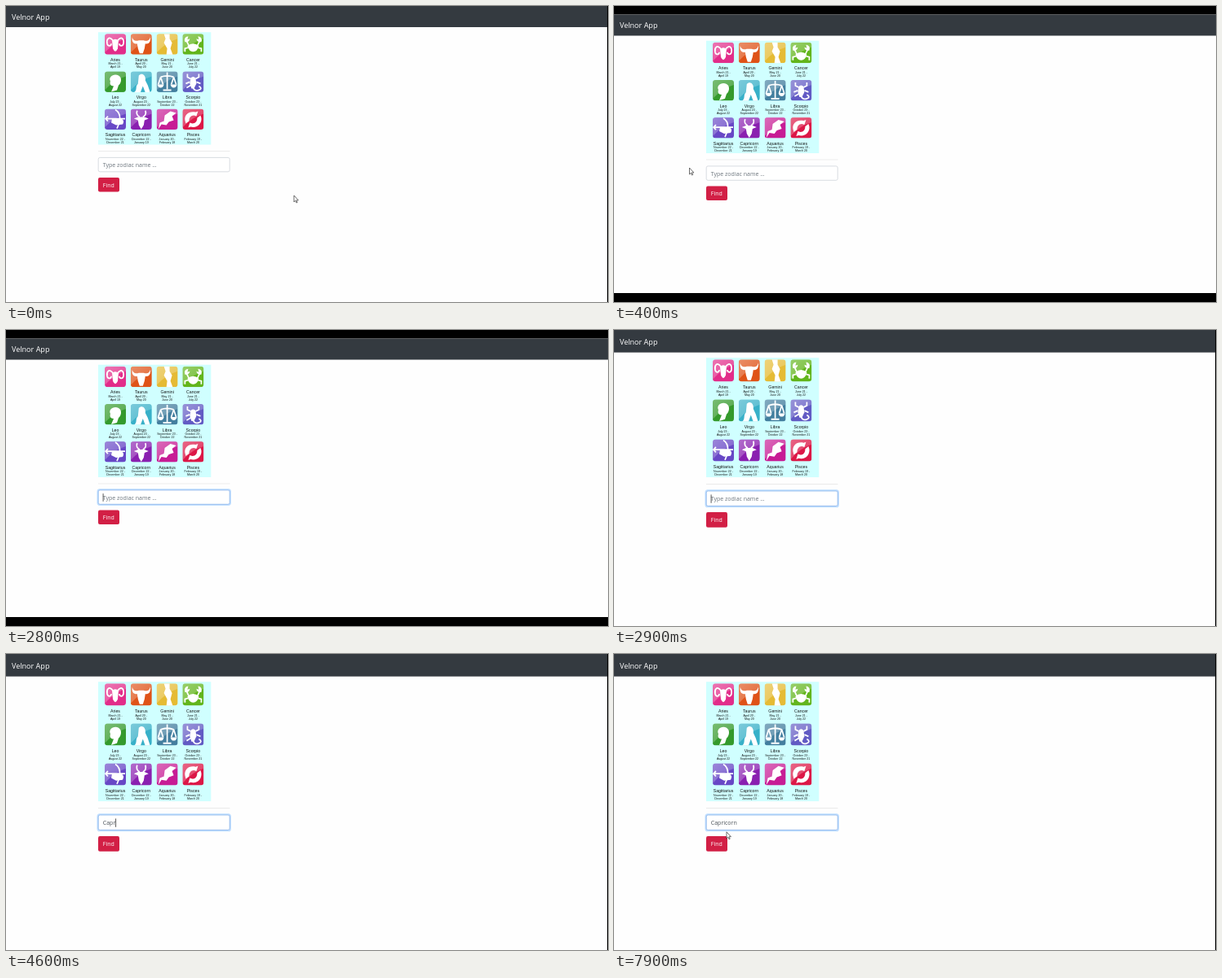
An HTML page that plays this animation: 738 px wide and 364 px high, repeating every 8 s.

```html
<!DOCTYPE html>
<html lang="en">
<head>
<meta charset="utf-8">
<style>
html, body { margin: 0; width: 100%; height: 100%; overflow: hidden; background: #fff; }
svg { display: block; width: 738px; height: 364px; }
.ui { font-family: "Open Sans", sans-serif; font-size: 7px; white-space: pre; }
.chart { font-family: "Liberation Sans", Arial, sans-serif; text-anchor: middle; fill: #111; }
</style>
</head>
<body>
<svg viewBox="0 0 738 364" xmlns="http://www.w3.org/2000/svg">
  <defs>
    <linearGradient id="shine" x1="0" y1="0" x2="1" y2="1">
      <stop offset="0" stop-color="#fff" stop-opacity=".34"/>
      <stop offset="1" stop-color="#fff" stop-opacity=".12"/>
    </linearGradient>
    <clipPath id="tile"><rect width="26" height="25.5" rx="3.6"/></clipPath>
  </defs>
  <rect width="738" height="364" fill="#fefefe"/>
  <g id="page" class="ui">
    <rect width="738" height="26" fill="#343a40"/>
    <text x="7" y="16.6" font-size="9.05" fill="#fff">Velnor App</text>
    <rect x="113" y="32.2" width="138.3" height="138.3" fill="#d0ffff"/>
    <g id="chart" class="chart"></g>
    <path d="M113 178.5H274.5" stroke="#e4e4e4" stroke-width=".7"/>
    <rect id="ring" x="112.3" y="185.5" width="162.9" height="19.2" rx="2.6" fill="none" stroke="#bfdeff" stroke-width="1.6"/>
    <rect id="field" x="113.2" y="186.4" width="161" height="17.4" rx="2" fill="#fff" stroke-width=".8"/>
    <text id="value" x="118.8" y="198.1"></text>
    <path id="caret" stroke="#333" stroke-width=".8"/>
    <rect x="113" y="211" width="26" height="17.6" rx="2" fill="#d21f45"/>
    <text x="118.8" y="222.5" fill="#fff">Find</text>
  </g>
  <g id="bars"><rect width="738" height="10.4"/><rect y="353" width="738" height="11"/></g>
  <rect id="edge" x="737" width="1" height="364"/>
  <path id="arrow" d="M0 0V8L1.8 6.3 3 9 4.2 8.5 3 5.9H5.4Z" fill="#fff" stroke="#333" stroke-width=".7"/>
  <path id="beam" d="M-1.5-4H1.5M0-4V4M-1.5 4H1.5" stroke="#333" stroke-width=".7"/>
</svg>
<script>
const el = id => document.getElementById(id);
const set = (id, attrs) => { for (const k in attrs) el(id).setAttribute(k, attrs[k]); };
const show = (id, on) => set(id, { visibility: on ? "visible" : "hidden" });

// name, first day, last day, colour, filled shape, stroked shape
const signs = [
  ["Aries", "March 21", "April 19", "#e22d8a",
    "M9 8Q13 5 17 8L16 18Q13 25 10 18Z", "M10 8C5 2 2 7 3 12C4 16 8 15 8 12M16 8C21 2 24 7 23 12C22 16 18 15 18 12"],
  ["Taurus", "April 20", "May 20", "#df5318",
    "M2 4C3 9 7 9 10 8H16C19 9 23 9 24 4C25 10 22 13 18 12L17 18 15 24H11L9 18 8 12C4 13 1 10 2 4Z", ""],
  ["Gemini", "May 21", "June 20", "#e5bb35",
    "M9 0H16V6L19 11 17 18 20 26H12L13 18 9 11 11 6Z", ""],
  ["Cancer", "June 21", "July 22", "#62b51c",
    "M6 15Q13 9 20 15Q18 22 13 22Q8 22 6 15ZM3 10Q1 4 7 3L6 7 9 6Q8 11 3 10ZM23 10Q25 4 19 3L20 7 17 6Q18 11 23 10Z",
    "M5 9L8 15M21 9L18 15M7 17L3 18 3 22M19 17L23 18 23 22"],
  ["Leo", "July 23", "August 22", "#349a2c",
    "M7 12C4 7 11 2 17 5C22 8 20 15 17 17L15 23 8 25 11 18C7 18 6 15 7 12Z", ""],
  ["Virgo", "August 23", "September 22", "#38b0c8",
    "M10 5C14 1 19 5 18 11L21 17 24 26H18L15 18 12 26H4C9 22 5 19 9 15Z", ""],
  ["Libra", "September 23", "October 22", "#437f9f",
    "M1 16H9Q8 20 5 20Q2 20 1 16ZM17 16H25Q24 20 21 20Q18 20 17 16ZM8 22H18V24H8Z",
    "M13 1V22M5 7Q13 4 21 7M5 7L2 16M5 7L8 16M21 7L18 16M21 7L24 16"],
  ["Scorpio", "October 23", "November 21", "#625bc4",
    "M10 8Q13 5 16 8L17 15 14 21H11L9 15Z",
    "M10 9L6 7 6 3M16 9L20 7 20 3M9 13L4 15M17 13L22 15M10 17L5 20M13 20Q15 25 20 23T20 18"],
  ["Sagittarius", "November 22", "December 21", "#6848c6",
    "M9 12H20Q25 14 22 19L14 20 8 17Z", "M1 12H25M13 1Q23 7 15 24M4 9L1 12 4 15"],
  ["Capricorn", "December 22", "January 19", "#8a20b0",
    "M9 10H17L22 12 17 14 16 20 13 25 10 20 9 14 4 12Z", "M11 10Q6 7 8 2M15 10Q20 7 18 2"],
  ["Aquarius", "January 20", "February 18", "#c71c95",
    "M10 8L17 3 24 5 19 9 21 14 15 16 12 20 6 19 2 25 4 17 9 15Z", ""],
  ["Pisces", "February 19", "March 20", "#dc1747",
    "M3 14C2 7 8 2 16 4L19 3 17 9 14 8C10 8 8 11 8 15L4 18ZM23 11C24 18 18 24 10 22L7 23 9 17 12 18C16 18 18 15 18 11L22 8Z", ""]
];

el("chart").innerHTML = signs.map(([name, from, to, color, fill, line], i) => {
  const x = 121 + (i % 4) * 31.8, y = 34.2 + Math.floor(i / 4) * 46.2;
  const label = (dy, size, text) =>
    `<text x="${x + 13}" y="${y + dy}" font-size="${size}">${text}</text>`;
  return `<g transform="translate(${x} ${y})" clip-path="url(#tile)">
    <rect width="26" height="25.5" fill="${color}"/>
    <path d="M0 0H26V6Q12 10 0 23Z" fill="url(#shine)"/>
    <path d="${fill}" fill="#fff"/>
    <path d="${line}" fill="none" stroke="#fff" stroke-width="1.7"/></g>` +
    label(33.6, 5.2, name) + label(38.1, 3.6, from + " -") + label(42.2, 3.6, to);
}).join("");

const LOOP = 8000, FOCUS = 1800;
const strokes = [3300, 4200, 4400, 4600, 5200, 5700, 6200, 6900, 7200];
const word = "Capricorn";
const approach = [[0, 353, 233], [100, 290, 224], [400, 92.5, 199], [900, 131, 208],
  [1200, 133, 212], [1600, 120, 206], [2400, 120, 206]];
const leave = [[7700, 158, 207], [7800, 148, 212], [7900, 138, 218.8], [8000, 138, 218.8]];

function pointAt(path, t) {
  const i = Math.max(1, path.findIndex(k => k[0] >= t));
  const [t0, x0, y0] = path[i - 1], [t1, x1, y1] = path[i];
  const p = (t - t0) / (t1 - t0);
  return [x0 + (x1 - x0) * p, y0 + (y1 - y0) * p];
}

function draw(ms) {
  const t = Math.floor((ms % LOOP) / 100) * 100;
  const boxed = t >= 100 && t < 2900, stretched = t >= 2900;
  const scale = stretched ? 1.062 : 1, shift = boxed ? 10.5 : 0;
  set("page", { transform: `translate(0 ${shift}) scale(1 ${scale})` });
  show("bars", boxed);
  show("edge", !boxed);

  const typed = strokes.filter(s => s <= t).length;
  const focused = t >= FOCUS;
  set("ring", { opacity: focused ? Math.min(1, (t - FOCUS + 100) / 200) : 0 });
  set("field", { stroke: focused ? "#80aeea" : "#ced4da" });
  el("value").textContent = typed ? word.slice(0, typed) : "Type zodiac name ...";
  set("value", { fill: typed === 1 ? "#b8525c" : typed ? "#495057" : "#6c757d" });

  const lastKey = typed ? strokes[typed - 1] : FOCUS;
  const caretX = 119.1 + (typed ? el("value").getComputedTextLength() : 0);
  set("caret", { d: `M${caretX} 190.6V200.4` });
  // the single letter is seen with its caret already off after 400 ms
  const blink = typed === 1 ? 400 : 500;
  show("caret", focused && Math.floor((t - lastKey) / blink) % 2 === 0);

  const path = t < 2400 ? approach : t >= 7700 ? leave : null;
  const [x, y] = path ? pointAt(path, t) : [0, 0];
  const pageY = (y - shift) / scale;
  const inField = x > 113 && x < 274 && pageY > 186 && pageY < 204;
  for (const id of ["arrow", "beam"]) set(id, { transform: `translate(${x} ${y})` });
  show("arrow", path && !inField);
  show("beam", path && inField);
}

const start = performance.now();
function tick() {
  draw(performance.now() - start);
  requestAnimationFrame(tick);
}
tick();
</script>
</body>
</html>
```
